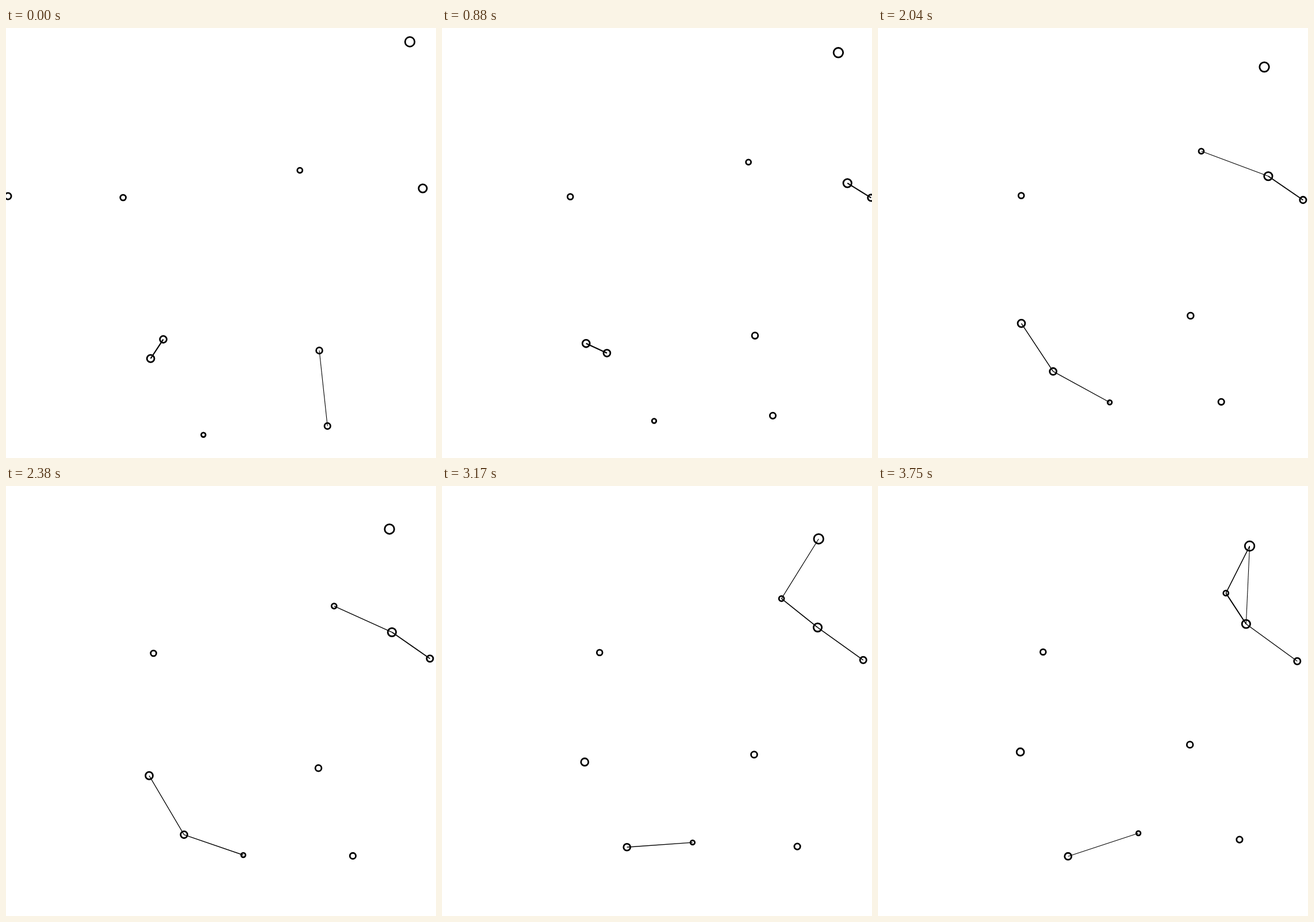
Recreate the animation shown at these times as an HTML page with a canvas. Size 748x748 px, loop 3790 ms.

```html
<!DOCTYPE html>
<html lang="en">
<head>
<meta charset="utf-8">
<title>Drifting nodes</title>
<style>
  html, body { margin: 0; width: 100%; height: 100%; overflow: hidden; background: #fff; }
  canvas { display: block; }
</style>
</head>
<body>
<canvas id="stage" width="748" height="748"></canvas>
<script>
const SIZE = 748, LOOP = 3790, LAST = 90, REACH = 140;
const ctx = document.getElementById('stage').getContext('2d');
ctx.strokeStyle = '#000';

// Start point and drift over one loop, from the largest node to the smallest
const nodes = [
  node(702.5, 24, -56, 80.5),
  node(725, 279, -84.7, -39),
  node(251.6, 575, -4, -112.3),
  node(273.6, 541.6, 57, 102.6),
  node(3.5, 292.5, -22.2, 12.2),
  node(545, 561, -2.4, -111),
  node(559.2, 692.4, 69.7, -77.3),
  node(203.7, 295, 83.5, -6.3),
  node(511.2, 247.6, 94, -61.2),
  node(343.4, 707.7, 109.6, -103.7)
];

function node(x, y, dx, dy) {
  return { x, y, dx, dy };
}

// Most nodes are of middling size, with a few extremes at either end
function radius(rank) {
  const u = 2 * rank / (nodes.length - 1) - 1;
  return 5.5 - u + 0.55 * u ** 2 - 1.25 * u ** 3;
}

const wrap = v => (v + SIZE) % SIZE;

// 24 steps per second, each starting on a 10 ms tick
const stepAt = ms => Math.ceil((Math.floor(ms / 10) + 0.5) * 6 / 25) - 1;

function stroke(width, trace) {
  ctx.lineWidth = width;
  ctx.beginPath();
  trace();
  ctx.stroke();
}

function link(a, b) {
  const near = 1 - Math.hypot(a.x - b.x, a.y - b.y) / REACH;
  if (near <= 0) return;
  stroke(1 + 1.7 * near, () => {
    ctx.moveTo(a.x, a.y);
    ctx.lineTo(b.x, b.y);
  });
}

function draw(k) {
  ctx.clearRect(0, 0, SIZE, SIZE);
  const points = nodes.map(n => ({ x: wrap(n.x + n.dx * k), y: wrap(n.y + n.dy * k) }));
  points.forEach((p, i) => {
    stroke(2.8, () => ctx.arc(p.x, p.y, radius(i), 0, Math.PI * 2));
    points.slice(i + 1).forEach(q => link(p, q));
  });
}

const start = performance.now();
function tick() {
  draw(stepAt((performance.now() - start) % LOOP) / LAST);
  requestAnimationFrame(tick);
}
tick();
</script>
</body>
</html>
```
